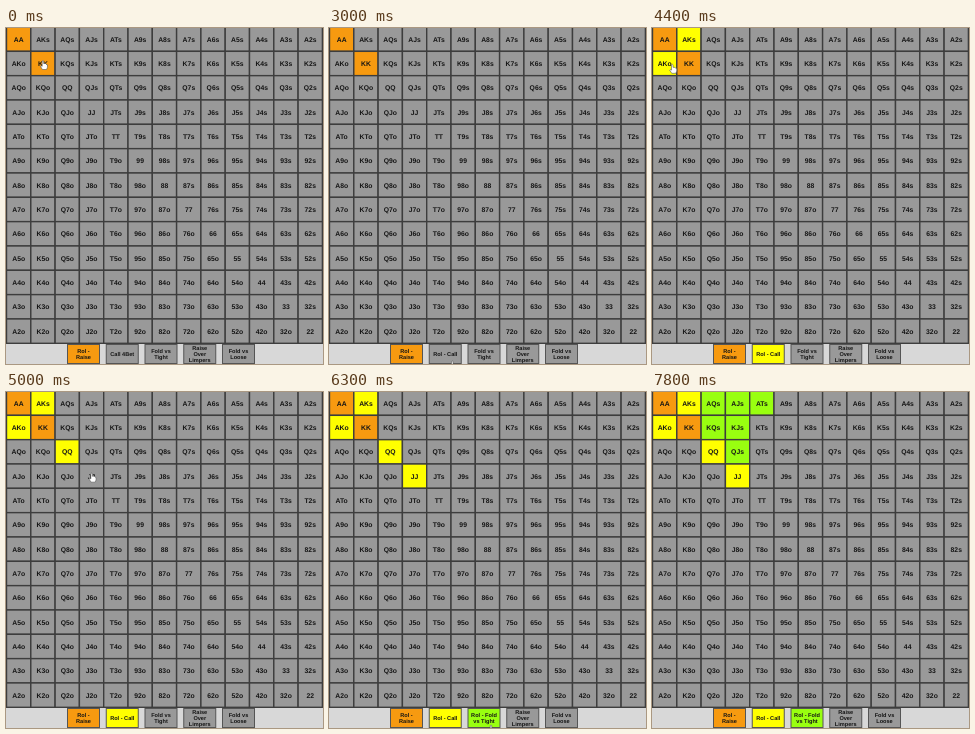
Animation of 317x336 px, one loop 8000 ms. Source, as an HTML page:

```html
<!DOCTYPE html>
<html lang="en">
<head>
<meta charset="utf-8">
<title>Starting hand chart</title>
<style>
  html, body { margin: 0; width: 100%; height: 100%; overflow: hidden; background: #d8d8d8; }
  svg { display: block; width: 317px; height: 336px; }
  text {
    font: bold 6.8px "Liberation Sans", Arial, sans-serif;
    text-anchor: middle; text-rendering: geometricPrecision; fill: #151515;
  }
  .button text { font-size: 5.6px; }
  .cell rect { stroke: #3d3d3d; stroke-width: 1.4; }
  .button rect { stroke: #555; stroke-width: 1; }
</style>
</head>
<body>
<svg viewBox="0 0 317 336">
  <g id="grid"></g>
  <g id="bar"></g>
  <g id="hand">
    <path transform="scale(.85)" fill="#fff" stroke="#555" stroke-width=".7" stroke-linejoin="round"
      d="M-.9 .6Q0 -.6 .9 .6V3.6Q3.6 3 4 4.6Q5.3 4.4 5.3 5.8V8L4.3 10.6H-.6L-3 6.8Q-2.6 5.4 -.9 6.8Z"/>
  </g>
</svg>
<script>
const LOOP = 8000, STEP = 100;
const GREY = '#999', ORANGE = '#f79a10', YELLOW = '#ffff00', GREEN = '#99ff10';
const ranks = 'AKQJT98765432';
const byId = id => document.getElementById(id);

function add(parent, tag, attrs = {}, content = '') {
  const el = document.createElementNS('http://www.w3.org/2000/svg', tag);
  for (const key in attrs) el.setAttribute(key, attrs[key]);
  el.textContent = content;
  return parent.appendChild(el);
}

function addBox(parent, x, y, width, height) {
  return add(parent, 'rect', { x, y, width, height, fill: GREY });
}

// Everything the hand can visit, by name; tx, ty is where the fingertip rests
const places = { away: { tx: 262, ty: 500 } };

const W = 24.3, H = 24.33;
for (let r = 0; r < 13; r++) {
  for (let c = 0; c < 13; c++) {
    const high = ranks[Math.min(r, c)], low = ranks[Math.max(r, c)];
    const name = high + low + (r === c ? '' : c > r ? 's' : 'o');
    const x = 0.5 + c * W, y = -1 + r * H;
    const g = add(byId('grid'), 'g', { class: 'cell' });
    const box = addBox(g, x, y, W, H);
    add(g, 'text', { x: x + W / 2, y: y + H / 2 + 2.4 }, name);
    places[name] = { box, tx: x + W / 2, ty: y + H / 2 - 3 };
  }
}

function addLabel(parent, x, str) {
  const g = add(parent, 'g');
  const lines = str.split('|');
  lines.forEach((line, i) =>
    add(g, 'text', { x, y: 328.2 + (i - (lines.length - 1) / 2) * 6.2 }, line));
  return g;
}

// Name, idle label, label once used, ink colour
const buttons = [
  ['raise', 'Rol -|Raise', 'Rol -|Raise', ORANGE],
  ['call', 'Call 4Bet', 'Rol - Call', YELLOW],
  ['tight', 'Fold vs|Tight', 'Rol - Fold|vs Tight', GREEN],
  ['limpers', 'Raise|Over|Limpers'],
  ['loose', 'Fold vs|Loose']
];

buttons.forEach(([name, idle, used, ink], i) => {
  const x = 61.5 + i * 38.75;
  const g = add(byId('bar'), 'g', { class: 'button' });
  const box = addBox(g, x, 316.5, 32, 19);
  const labels = [idle, used || idle].map(str => addLabel(g, x + 16, str));
  places[name] = { box, labels, ink, usedAt: LOOP, tx: x + 23, ty: 333 };
});

// The hand's visits: place, arrival, departure, delay before the click
const visits = [
  ['KK', 0, 0],
  ['away', 200, 2900],
  ['call', 3000, 3600, 200],
  ['AKs', 4000, 4100],
  ['AKo', 4200, 4300],
  ['QQ', 4700, 4800],
  ['JJ', 5000, 5900, 300],
  ['tight', 6200, 6400],
  ['AQs', 6800, 6800],
  ['AJs', 6900, 6900],
  ['ATs', 7000, 7000],
  ['KJs', 7100, 7100],
  ['KQs', 7300, 7300],
  ['QJs', 7600, 7700],
  ['away', 7800, LOOP]
].map(([name, arrive, leave, delay = STEP]) =>
  ({ place: places[name], arrive, leave, click: arrive + delay }));

// A clicked button sets the ink; later clicks paint cells with it
const paints = ['AA', 'KK', 'raise'].map(name => [places[name].box, 0, ORANGE]);
let ink = ORANGE;
for (const { place, arrive, click } of visits) {
  if (place.ink) {
    ink = place.ink;
    place.usedAt = arrive;
  }
  if (place.box) paints.push([place.box, place === places.KK ? 0 : click, ink]);
}

function handAt(t) {
  const next = visits.findIndex(v => t <= v.leave);
  const to = visits[next], from = visits[next - 1] || to;
  const span = to.arrive - from.leave;
  const k = span ? Math.min(1, (t - from.leave) / span) : 1;
  const ease = k * k * (3 - 2 * k);
  return ['tx', 'ty'].map(a => from.place[a] + (to.place[a] - from.place[a]) * ease);
}

function draw(ms) {
  const t = Math.floor((ms % LOOP) / STEP) * STEP;
  for (const [box, at, colour] of paints) box.setAttribute('fill', t >= at ? colour : GREY);
  for (const { labels, usedAt } of Object.values(places)) {
    if (!labels) continue;
    labels[0].style.display = t < usedAt ? '' : 'none';
    labels[1].style.display = t < usedAt ? 'none' : '';
  }
  byId('hand').setAttribute('transform', `translate(${handAt(t)})`);
}

const start = performance.now();
function tick() {
  draw(performance.now() - start);
  requestAnimationFrame(tick);
}
tick();
</script>
</body>
</html>
```
